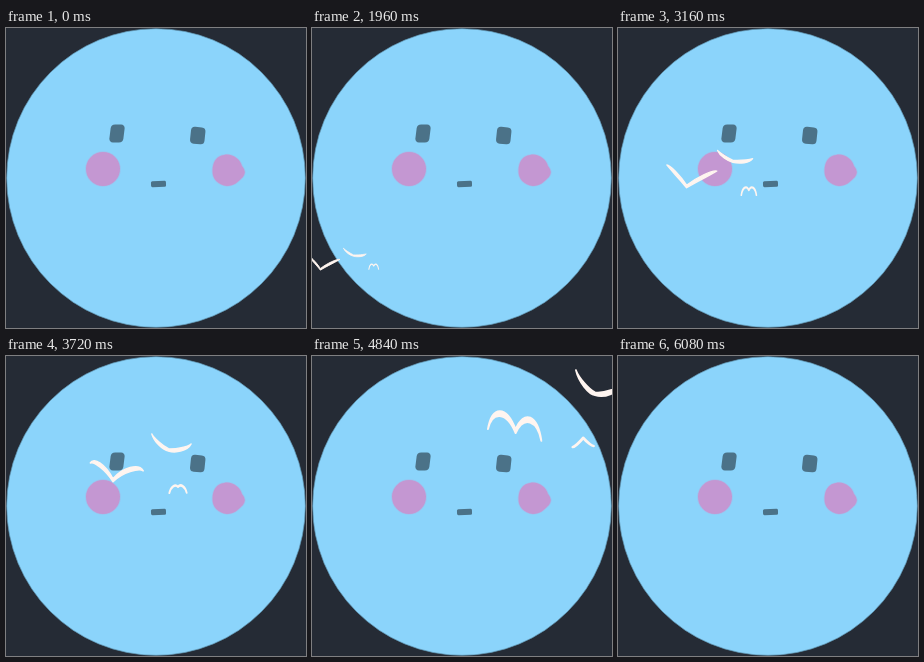
Animation of 300 by 300 pixels, one loop 8240 ms. Source, as an HTML page:

```html
<!DOCTYPE html>
<html lang="en">
<head>
<meta charset="utf-8">
<title>Birds</title>
<style>
html, body { margin: 0; width: 100%; height: 100%; overflow: hidden; background: #252b35; }
svg { display: block; width: 100%; height: 100%; }
</style>
</head>
<body>
<svg viewBox="0 0 300 300">
  <rect width="300" height="300" fill="#252b35"/>
  <circle cx="150" cy="150" r="149.3" fill="#8bd4fb" stroke="#6299b5" stroke-width="0.7"/>
  <g fill="#4b7288">
    <rect x="-7" y="-9" width="14" height="18" rx="4" transform="translate(111 105.500) skewX(-7)"/>
    <rect x="-7" y="-8.500" width="14.500" height="17" rx="4" transform="translate(191.500 107.500) rotate(6)"/>
    <rect x="-7.500" y="-3" width="15" height="6" rx="1.500" transform="translate(152.500 156) rotate(-2)"/>
  </g>
  <g fill="#c497d2" stroke="#c497d2" stroke-opacity="0.3" stroke-width="1.500">
    <circle cx="97" cy="141" r="17"/>
    <path d="M218 127C226 125 234 131 236 138Q241 144 237 149C232 154 228 158 221 158C212 157 206 151 206.500 142C207 133 211 128 218 127Z"/>
  </g>
  <g id="flock" fill="#fff5f0" stroke="#fff5f0" stroke-linejoin="round" stroke-linecap="round"></g>
</svg>
<script>
const LOOP = 8240, STEP = 40, START = 600, END = 6080, MIDWAY = 3720, FLAP = 0.6;

// x, speed, accel: flight across, in px and seconds from midway.
// top, drop, reach: height as an exponential glide over x.
// low, high: both ends of the wing beat as left tip, right tip, bow.
const birds = [
  {
    x: 107, speed: 74.5, accel: 10.5, top: 36, drop: 220, reach: 115,
    beat: 0.2, thick: 5.6, line: 1.8,
    low: [-26, 0, 24, 11, 23], high: [-26, -27, 40, -19, 4]
  },
  {
    x: 162.5, speed: 92.5, accel: 13.5, top: -5, drop: 312, reach: 140,
    beat: 0.65, thick: 4.6, line: 1.6,
    low: [-24, 0, 26, 9, 4], high: [-18, -21, 26, -9, -4]
  },
  {
    x: 172, speed: 78.5, accel: 9, top: 27, drop: 314, reach: 155,
    beat: 0.2, thick: 1, line: 2.1,
    low: [-10, 9, 10, 8, -1], high: [-10, 7, 10, 7, 10]
  }
];

// Handles lie along the chord from body to tip, lifted by the bow.
const handle = (x, y, k, lift) => `${x * k} ${y * k - lift}`;

function wings([lx, ly, rx, ry, bow], thick) {
  const left = (k, d) => handle(lx, ly, k, bow - d);
  const right = (k, d) => handle(rx, ry, k, bow - d);
  const inner = 0.33, outer = 0.85;
  return `M${lx} ${ly}C${left(outer, 0)} ${left(inner, 0)} 0 0`
    + `C${right(inner, 0)} ${right(outer, 0)} ${rx} ${ry}`
    + `C${right(outer, thick)} ${right(inner, thick)} 0 ${thick * 0.6}`
    + `C${left(inner, thick)} ${left(outer, thick)} ${lx} ${ly}Z`;
}

const flock = document.getElementById("flock");
for (const b of birds) {
  b.el = document.createElementNS("http://www.w3.org/2000/svg", "path");
  b.el.setAttribute("stroke-width", b.line);
  flock.appendChild(b.el);
}

function fly(b, s) {
  const x = b.x + b.speed * s + b.accel * s * s;
  const y = b.top + b.drop * Math.exp(-x / b.reach);
  const size = 0.87 + 0.19 * s - 0.015 * s * s;
  // The beat is strongest midway, held a little at either end.
  const wave = Math.sin((s + b.beat * 0.1) / FLAP * Math.PI * 2 + (b.beat > 0.5 ? 1.8 : 0));
  const up = Math.max(-0.1, Math.min(1.15, 0.5 + wave * (b.beat > 0.5 ? 0.5 : 0.83)));
  const pose = b.low.map((v, i) => v + (b.high[i] - v) * up);
  b.el.setAttribute("d", wings(pose, b.thick));
  b.el.setAttribute("transform", `translate(${x} ${y}) scale(${size})`);
}

function draw(ms) {
  const t = Math.floor(ms % LOOP / STEP) * STEP;
  const flying = t >= START && t < END;
  flock.setAttribute("visibility", flying ? "visible" : "hidden");
  if (flying) birds.forEach(b => fly(b, (t - MIDWAY) / 1000));
}

const begin = performance.now();
function tick() {
  draw(performance.now() - begin);
  requestAnimationFrame(tick);
}
tick();
</script>
</body>
</html>
```
